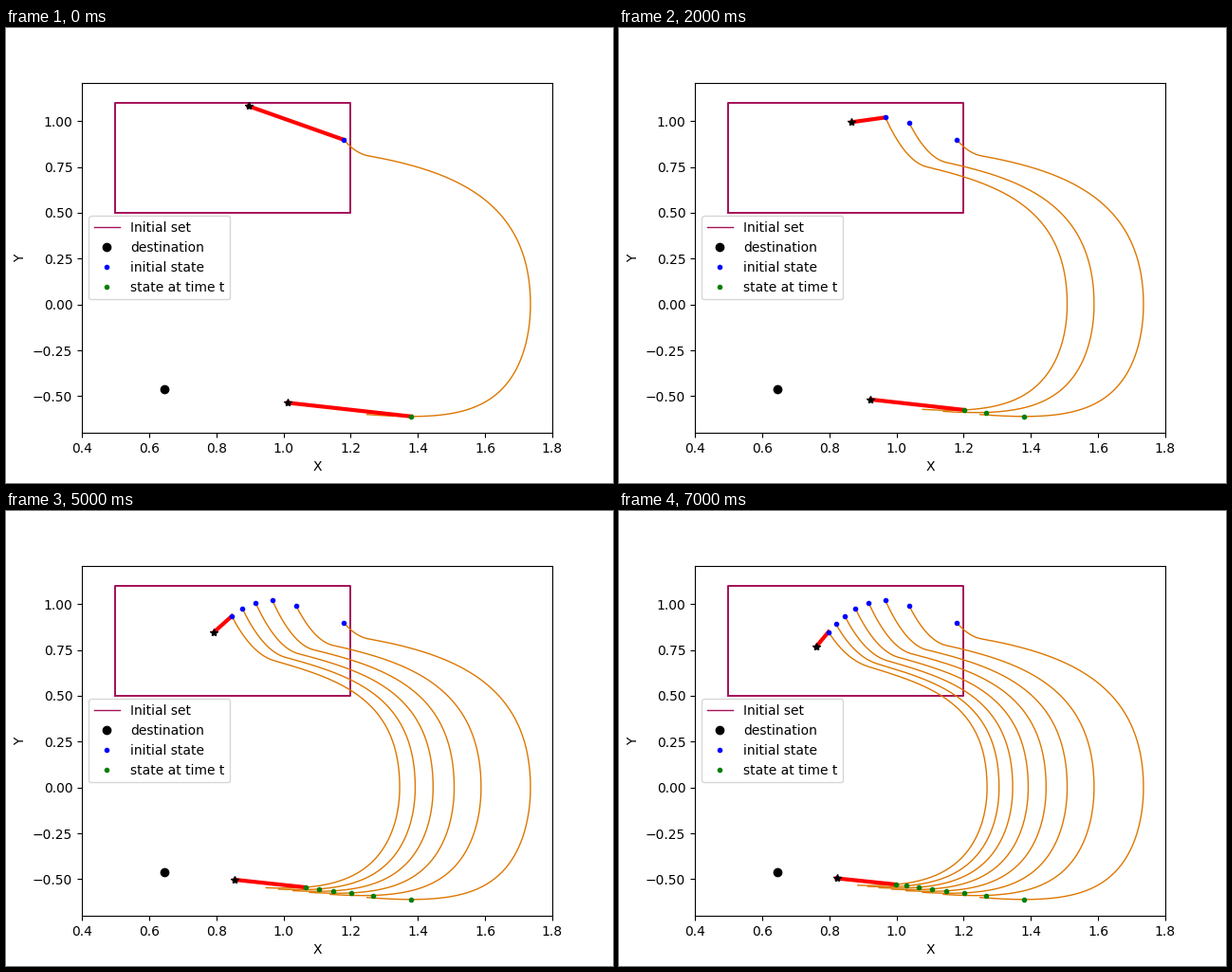
These frames come from a looping animation (640 by 480 pixels, 8000 ms). A matplotlib script:

```python
import numpy as np
import matplotlib.pyplot as plt
from matplotlib.animation import FuncAnimation

ORANGE, PLUM = "#dd7700", "#a6145a"
RUNS = 8
GOAL = np.array([0.6455, -0.461])

# Key runs: largest X of the trajectory, then the initial X and Y.
# The search slows down, so the runs between follow a curve in log time.
KEY_RUNS = np.array([0, 1, 2, 4, 8])
KEYS = np.array([
    (1.735, 1.180, 0.898),
    (1.588, 1.038, 0.990),
    (1.508, 0.967, 1.020),
    (1.392, 0.878, 0.975),
    (1.238, 0.779, 0.8075),
])
FIT = np.polyfit(np.log1p(KEY_RUNS), KEYS, 4)


def run_values(n):
    """Largest X and initial state of run n."""
    top, x, y = np.log1p(n) ** np.arange(4, -1, -1) @ FIT
    return top, np.array([x, y])


def bezier(*points, n=60):
    """Bezier curve of any degree by repeated blending."""
    a = np.linspace(0, 1, n)[:, None]
    level = [np.array(p) for p in points]
    while len(level) > 1:
        level = [(1 - a) * p + a * q for p, q in zip(level, level[1:])]
    return level[0]


def depth(s, top, gain):
    """|Y| at distance s left of the turning point, for x' = y, y' = gain y^2 - x."""
    k = 0.5 / gain ** 2
    w = (top - s) / gain + k - (top / gain + k) * np.exp(-2 * gain * s)
    return np.sqrt(np.maximum(w, 0))


def trajectory(top, start):
    """Path of one run and its state at time t."""
    d = KEYS[0, 0] - top

    # quick drop from the initial state to the knee
    knee = np.array([0.723 * top, 0.81 - 0.2 * d - 0.27 * d * d])
    slope = -0.33 - 0.5 * d
    dx, dy = knee - start
    steep = 1.85 * dy / dx
    t = (dy - slope * dx) / (steep - slope)
    drop = bezier(start, start + [t, steep * t], knee)

    # wide sweep to the turning point on the X axis
    reach = 0.52 * (top - knee[0])
    sweep = bezier(knee, knee + [reach, slope * reach],
                   (top, 0.7 * knee[1]), (top, 0))

    # return below the axis, going a little past the state at time t
    gain = 3.25 + 0.99 * (top - 1.27)
    now = 1.38 - 0.757 * d - 0.134 * d * d
    y = depth(top - now, top, gain)
    s = (top - now + 0.215 * y) * np.linspace(0, 1, 80) ** 2
    back = np.column_stack([top - s, -depth(s, top, gain)])
    return np.vstack([drop, sweep, back]), np.array([now, -y])


fig, ax = plt.subplots(figsize=(6.4, 4.8), dpi=100)
ax.set_xlim(0.4, 1.8)
ax.set_ylim(-0.7, 1.21)
ax.set_xlabel("X")
ax.set_ylabel("Y")

# just under two pixels, so that the edges snap to whole pixels
ax.plot([0.5, 1.2, 1.2, 0.5, 0.5], [0.5, 0.5, 1.1, 1.1, 0.5], color=PLUM, lw=1.43)
ax.plot(*GOAL, "ko", ms=6)

trails, arms = [], []
for n in range(RUNS):
    top, start = run_values(n)
    path, state = trajectory(top, start)
    trails.append([
        ax.plot(*path.T, color=ORANGE, lw=1, zorder=2)[0],
        ax.plot(*start, "b.", ms=6, zorder=4)[0],
        ax.plot(*state, "g.", ms=6, zorder=4)[0],
    ])

    # the search takes half of the upper step; the lower arm aims at the goal
    following = run_values(n + 1)[1]
    arm = []
    for base, star in ((start, 2 * following - start), (state, (state + GOAL) / 2)):
        arm += ax.plot(*zip(star, base), "r-", lw=3, zorder=3)
        arm += ax.plot(*star, "k*", ms=6, zorder=4)
    arms.append(arm)


def key(label, color, **style):
    return plt.Line2D([], [], label=label, color=color, **style)


ax.legend(loc="center left", handles=[
    key("Initial set", PLUM, lw=1),
    key("destination", "k", marker="o", ls=""),
    key("initial state", "b", marker=".", ls=""),
    key("state at time t", "g", marker=".", ls=""),
])


def update(n):
    for i, (trail, arm) in enumerate(zip(trails, arms)):
        for artist in trail:
            artist.set_visible(i <= n)
        for artist in arm:
            artist.set_visible(i == n)
    return []


anim = FuncAnimation(fig, update, frames=RUNS, init_func=lambda: update(0),
                     interval=1000, repeat=True, repeat_delay=0)
plt.show()
```
